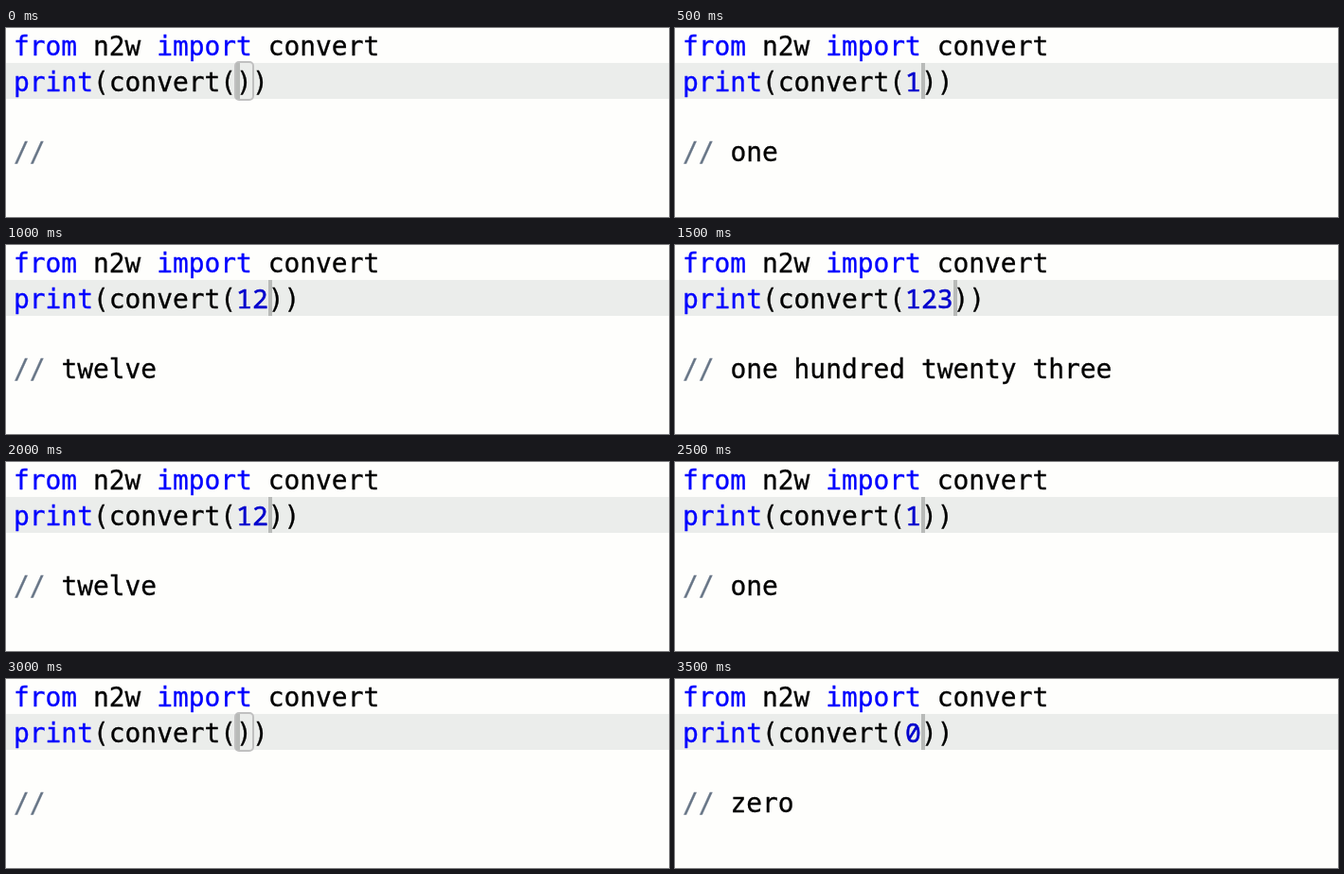
Animation, 700 px wide and 200 px high, one loop 4 s. Source, as an HTML page:

```html
<!DOCTYPE html>
<html lang="en">
<head>
<meta charset="utf-8">
<title>Number to words</title>
<style>
  html, body { margin: 0; width: 100%; height: 100%; overflow: hidden; background: #fefefc; }
  svg { display: block; width: 700px; height: 200px; }
  text {
    font: 27.9px "DejaVu Sans Mono", monospace;
    white-space: pre;
    color: #000;
    fill: currentColor;
    stroke: currentColor;
    stroke-width: .3px;
  }
  .key { color: #00f; }
  .num { color: #0000cd; font: 28px "Noto Sans Mono", monospace; stroke-width: .5px; }
  .op { color: #687687; }
</style>
</head>
<body>
<svg viewBox="0 0 700 200">
  <rect width="700" height="200" fill="#fefefc"/>
  <rect y="37" width="700" height="38" fill="#ebedeb"/>
  <rect id="bracket" y="36" width="19" height="40" rx="4" fill="none" stroke="#c0c0c0" stroke-width="2"/>
  <rect id="caret" y="37" width="4" height="38" fill="#b8bab8"/>
  <text x="8" y="29"><tspan class="key">from</tspan> n2w <tspan class="key">import</tspan> convert</text>
  <text x="8" y="67"><tspan class="key">print</tspan>(convert(<tspan class="num" id="arg"></tspan>))</text>
  <text x="8" y="141"><tspan class="op">//</tspan> <tspan id="words"></tspan></text>
</svg>
<script>
  const STEP = 500, LEFT = 8, CHAR = 16.8, PREFIX = "print(convert(".length;
  const inputs = ["", "1", "12", "123", "12", "1", "", "0"];
  const spoken = { "": "", 0: "zero", 1: "one", 12: "twelve", 123: "one hundred twenty three" };
  const el = id => document.getElementById(id);
  const [bracket, caret, arg, words] = ["bracket", "caret", "arg", "words"].map(el);
  let shown = -1;

  function draw(ms) {
    const step = Math.floor(ms / STEP) % inputs.length;
    if (step === shown) return;
    shown = step;
    const value = inputs[step];
    const x = LEFT + (PREFIX + value.length) * CHAR;
    arg.textContent = value;
    words.textContent = spoken[value];
    caret.setAttribute("x", Math.round(x));
    bracket.setAttribute("x", Math.round(x) - 1);
    bracket.style.display = value ? "none" : "";
  }

  const start = performance.now();
  function tick() {
    draw(performance.now() - start);
    requestAnimationFrame(tick);
  }
  tick();
</script>
</body>
</html>
```
